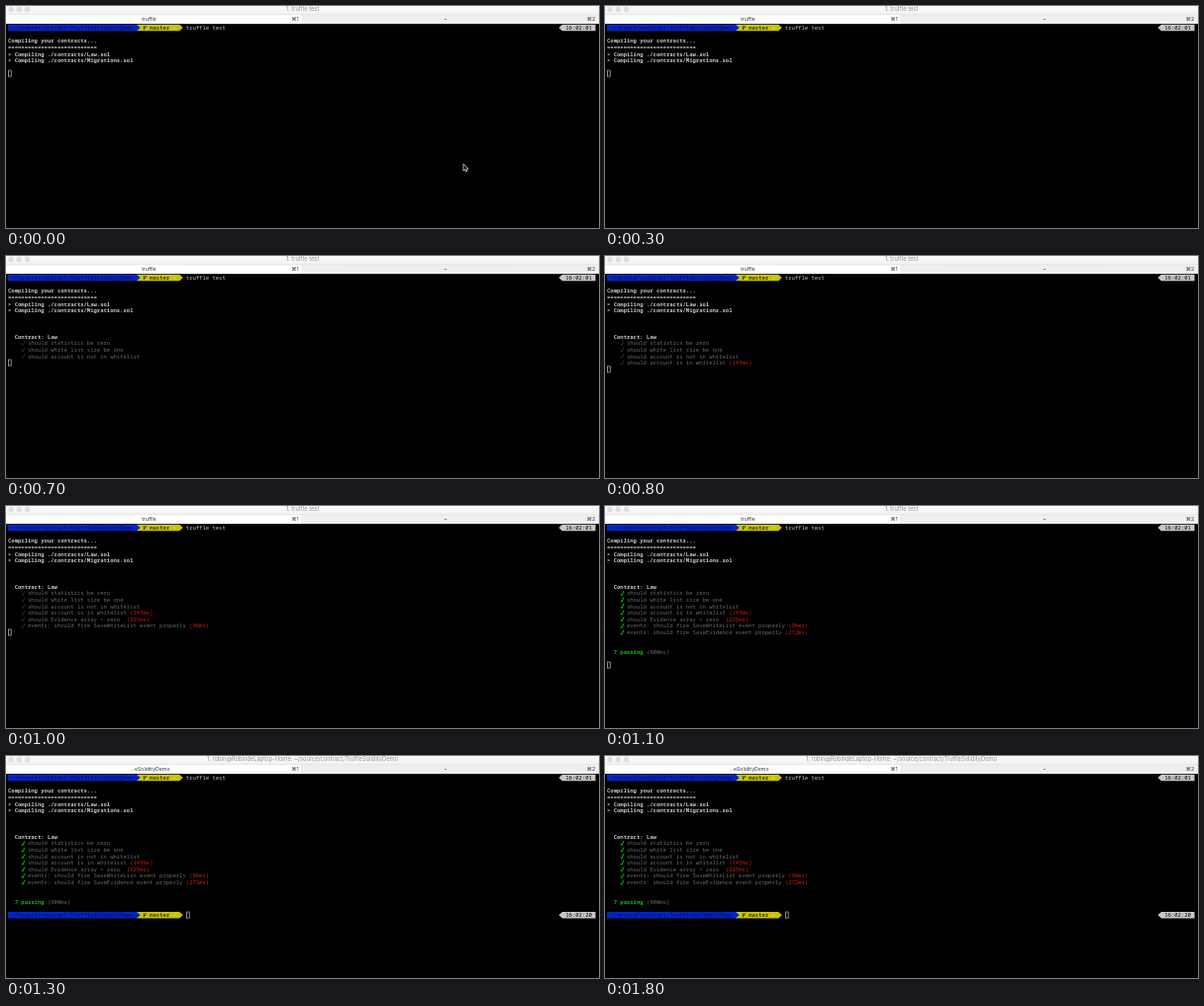
An HTML page that plays this animation: 599 by 225 pixels, repeating every 2 s.

```html
<!DOCTYPE html>
<html lang="en">
<head>
<meta charset="utf-8">
<title>Terminal test run</title>
<style>
  html, body { margin: 0; width: 100%; height: 100%; overflow: hidden; background: #000; }
  svg { display: block; width: 599px; height: 225px; }
  text { white-space: pre; }
  .ui { font: 5.75px Inter, "DejaVu Sans", sans-serif; text-anchor: middle; fill: #333; }
  .title { fill: #929292; }
  .term { font: 5.55px "Noto Sans Mono", "DejaVu Sans Mono", monospace; fill: #c7c7c7; }
  .bold { font-weight: 700; }
  .dim { fill: #6b6b6b; }
  .red { fill: #d01f0c; }
  .green { fill: #00c200; font-weight: 700; }
  .ink { fill: #000; }
  .path { fill: #000; opacity: .7; }
  .check { fill: none; stroke: #465046; stroke-width: .6; animation: brighten 2s step-end infinite; }
  .at700 { animation: at700 2s step-end infinite; }
  .at800 { animation: at800 2s step-end infinite; }
  .at900 { animation: at900 2s step-end infinite; }
  .at1000 { animation: at1000 2s step-end infinite; }
  .at1100 { animation: at1100 2s step-end infinite; }
  .at1200 { animation: at1200 2s step-end infinite; }
  .at1300 { animation: at1300 2s step-end infinite; }
  .to100 { animation: to100 2s step-end infinite; }
  .to1200 { animation: to1200 2s step-end infinite; }
  #caret { animation: caret 2s step-end infinite; }
  @keyframes at700 { 0% { visibility: hidden } 35% { visibility: visible } }
  @keyframes at800 { 0% { visibility: hidden } 40% { visibility: visible } }
  @keyframes at900 { 0% { visibility: hidden } 45% { visibility: visible } }
  @keyframes at1000 { 0% { visibility: hidden } 50% { visibility: visible } }
  @keyframes at1100 { 0% { visibility: hidden } 55% { visibility: visible } }
  @keyframes at1200 { 0% { visibility: hidden } 60% { visibility: visible } }
  @keyframes at1300 { 0% { visibility: hidden } 65% { visibility: visible } }
  @keyframes to100 { 0% { visibility: visible } 5%, 100% { visibility: hidden } }
  @keyframes to1200 { 0% { visibility: visible } 60%, 100% { visibility: hidden } }
  @keyframes brighten {
    0% { stroke: #465046; stroke-width: .6px }
    55%, 100% { stroke: #00d000; stroke-width: 1px }
  }
  @keyframes caret {
    0% { transform: translate(2px, 68.4px) }
    35% { transform: translate(2px, 108.2px) }
    40% { transform: translate(2px, 114.8px) }
    45% { transform: translate(2px, 121.4px) }
    50% { transform: translate(2px, 128.1px) }
    55% { transform: translate(2px, 161.2px) }
    65%, 100% { transform: translate(182px, 161.2px) }
  }
</style>
</head>
<body>
<svg viewBox="0 0 599 225">
  <defs>
    <linearGradient id="bar" x2="0" y2="1">
      <stop stop-color="#fafafa"/><stop offset="1" stop-color="#f1f1f1"/>
    </linearGradient>
    <g id="prompt">
      <path d="M132-3.3H175.2L178.8 0 175.2 3.3H132Z" fill="#c7c400"/>
      <path d="M2-3.3H132L135.6 0 132 3.3H2Z" fill="#0225c7"/>
      <path d="M562-3.3H595.5V3.3H562L558.4 0Z" fill="#c7c7c7"/>
      <path d="M139.4-2V2M141.4-2V-.8Q141.4.2 139.4.8" fill="none" stroke="#000" stroke-width=".7"/>
      <circle cx="170.2" cy="0" r="1.1"/>
    </g>
  </defs>

  <rect width="599" height="225"/>
  <rect width="599" height="9" fill="url(#bar)"/>
  <rect y="9" width="299" height="9" fill="#fff"/>
  <rect x="299" y="9" width="300" height="9" fill="#efefef"/>
  <path d="M0 8.8H599M299 9V18" stroke="#d6d6d6" stroke-width=".5"/>
  <path d="M180 18.6H560" stroke="#164016" stroke-width=".7"/>
  <g fill="#dedede" stroke="#cfcfcf" stroke-width=".4">
    <circle cx="5" cy="3.4" r="2.4"/><circle cx="13.3" cy="3.4" r="2.4"/><circle cx="21.6" cy="3.4" r="2.4"/>
  </g>
  <g class="ui">
    <text class="title to1200" x="299.5" y="5.4">1. truffle test</text>
    <text class="title at1200" x="299.5" y="5.4">1. robin@RobindeLaptop-Home: ~/source/contract/TruffleSolidityDemo</text>
    <g font-size="5.2">
      <text class="to1200" x="144.5" y="14.6" style="font-size:5.2px">truffle</text>
      <text class="at1200" x="145.5" y="14.6" style="font-size:5.2px">…eSolidityDemo</text>
    </g>
    <text x="292" y="14.6" style="font-size:5.2px">⌘1</text>
    <text x="444" y="14.6" style="font-size:5.2px">~</text>
    <text x="591" y="14.6" style="font-size:5.2px">⌘2</text>
  </g>

  <g id="screen" class="term"></g>
  <rect id="caret" x=".4" y="-3" width="2.8" height="6" fill="none" stroke="#c7c7c7" stroke-width=".7"/>
  <path class="to100" d="M462 160V167L463.6 165.6 464.7 168 465.8 167.5 464.8 165.2H467Z" stroke="#fff" stroke-width=".7"/>
</svg>
<script>
  const NS = 'http://www.w3.org/2000/svg';
  const screen = document.getElementById('screen');
  const colX = col => 2 + col * 3.33;
  const rowY = row => 22 + row * 6.63;

  function add(parent, tag, attrs, content = '') {
    const el = document.createElementNS(NS, tag);
    for (const key in attrs) el.setAttribute(key, attrs[key]);
    el.textContent = content;
    return parent.appendChild(el);
  }

  function write(parent, row, col, content, cls = '') {
    add(parent, 'text', { x: colX(col), y: rowY(row) + 2, class: cls }, content);
  }

  function prompt(row, time, cls = '') {
    const g = add(screen, 'g', { class: cls });
    add(g, 'use', { href: '#prompt', y: rowY(row) });
    write(g, row, 1, '~/source/contract/TruffleSolidityDemo', 'path');
    write(g, row, 43, 'master', 'ink');
    add(g, 'text', { x: 565.3, y: rowY(row) + 2, class: 'ink' }, time);
  }

  function test(row, cls, label, time) {
    const g = add(screen, 'g', { class: cls });
    add(g, 'path', { class: 'check', d: `M15.8 ${rowY(row) + .8}l1 1.4 2.2-4.4` });
    write(g, row, 6, label, 'dim');
    if (time) write(g, row, 7 + label.length, time, 'red');
  }

  prompt(0, '16:02:01');
  write(screen, 0, 54, 'truffle test');
  write(screen, 2, 0, 'Compiling your contracts...', 'bold');
  write(screen, 3, 0, '='.repeat(27), 'bold');
  write(screen, 4, 0, '> Compiling ./contracts/Law.sol', 'bold');
  write(screen, 5, 0, '> Compiling ./contracts/Migrations.sol', 'bold');

  write(screen, 9, 2, 'Contract: Law', 'bold at700');
  test(10, 'at700', 'should statistics be zero');
  test(11, 'at700', 'should white list size be one');
  test(12, 'at700', 'should account is not in whitelist');
  test(13, 'at800', 'should account is in whitelist', '(145ms)');
  test(14, 'at900', 'should Evidence array > zero ', '(225ms)');
  test(15, 'at1000', 'events: should fire SaveWhiteList event properly', '(96ms)');
  test(16, 'at1100', 'events: should fire SaveEvidence event properly', '(272ms)');
  write(screen, 19, 2, '7 passing', 'green at1100');
  write(screen, 19, 12, '(900ms)', 'dim at1100');
  prompt(21, '16:02:20', 'at1300');
</script>
</body>
</html>
```
